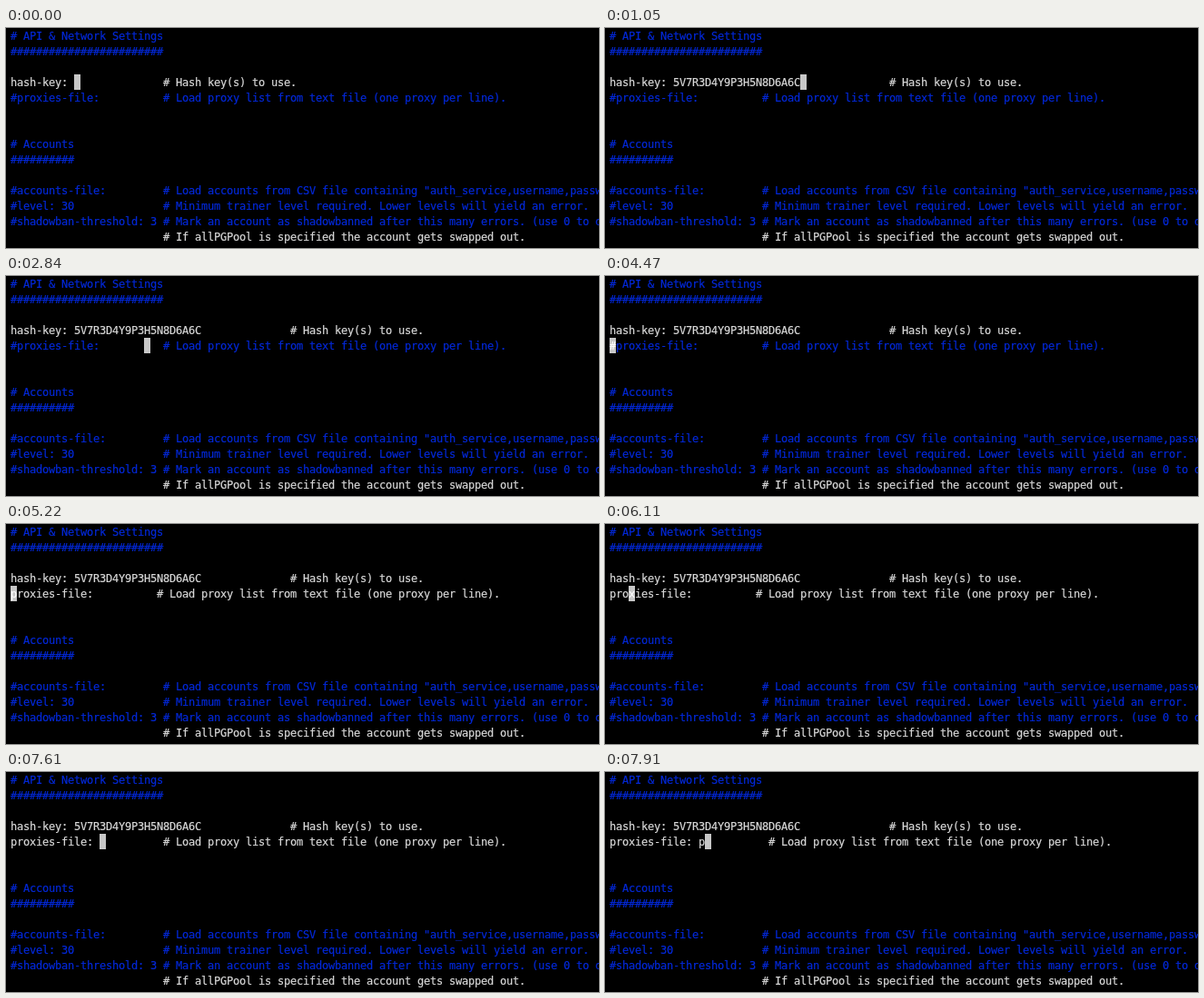
An HTML page for the animation above (8 s loop, 653 px wide and 242 px high).

```html
<!DOCTYPE html>
<html lang="en">
<head>
<meta charset="utf-8">
<title>Config editing</title>
<style>
  html, body { margin: 0; width: 100%; height: 100%; overflow: hidden; background: #000; }
  #screen {
    position: relative; width: 653px; height: 242px; overflow: hidden;
    font: 12px/19px "DejaVu Sans Mono", Menlo, monospace;
    font-variant-ligatures: none;
    -webkit-text-stroke: 0.2px;
    color: #d8d8d8;
  }
  .row { position: absolute; left: 5px; height: 17px; white-space: pre; }
  .blue { color: #0328d8; }
  #cursor {
    position: absolute; width: 7px; height: 17px; overflow: hidden;
    white-space: pre; background: #c7c7c7; color: #fff;
  }
</style>
</head>
<body>
<div id="screen"></div>
<script>
const CELL = 7, LINE = 17, LEFT = 5, LOOP = 8000, COMMENT = 24;
const KEY_ROW = 3, PROXY_ROW = 4;
const screen = document.getElementById("screen");

const entry = (name, note, col = COMMENT) => name.padEnd(col) + note;
const keyNote = "# Hash key(s) to use.";
const proxyNote = "# Load proxy list from text file (one proxy per line).";

const keyLine = key => "hash-key: " + key + " ".repeat(14) + keyNote;
const emptyKey = keyLine("");
const filledKey = keyLine("5V7R3D4Y9P3H5N8D6A6C");
const commented = entry("#proxies-file:", proxyNote);
const active = entry("proxies-file:", proxyNote, 23);
const spaced = entry("proxies-file: ", proxyNote, 24);
const typed = entry("proxies-file: p", proxyNote, 25);

const lines = [
  "# API & Network Settings",
  "#".repeat(24),
  "",
  emptyKey,
  commented,
  "",
  "",
  "# Accounts",
  "#".repeat(10),
  "",
  entry("#accounts-file:", '# Load accounts from CSV file containing "auth_service,username,password" on each line.'),
  entry("#level: 30", "# Minimum trainer level required. Lower levels will yield an error."),
  entry("#shadowban-threshold: 3", "# Mark an account as shadowbanned after this many errors. (use 0 to disable)"),
  entry("", "# If allPGPool is specified the account gets swapped out.")
];

const rows = lines.map((text, i) => {
  const el = document.createElement("div");
  el.className = "row";
  el.style.top = i * LINE + "px";
  screen.append(el);
  return el;
});
const cursor = document.createElement("div");
cursor.id = "cursor";
screen.append(cursor);

// Snap the font's advance to the terminal's whole-pixel cell.
rows[0].textContent = "0".repeat(100);
const advance = rows[0].getBoundingClientRect().width / 100;
screen.style.letterSpacing = CELL - advance + "px";

function setRow(i, text) {
  if (rows[i].textContent === text) return;
  rows[i].textContent = text;
  rows[i].classList.toggle("blue", text.startsWith("#"));
}
lines.forEach((text, i) => setRow(i, text));

// Cursor moves while an arrow key is held down.
const glide = (start, end, count, from, to) =>
  Array.from({ length: count }, (_, i) => ({
    at: start + (end - start) * i / (count - 1),
    col: Math.round(from + (to - from) * (i + 1) / count)
  }));

const steps = [
  { at: 0, row: KEY_ROW, col: 10, key: emptyKey, proxy: commented },
  { at: 1050, col: 30, key: filledKey },
  { at: 1500, row: PROXY_ROW },
  { at: 1800, col: 29 },
  ...glide(2250, 3280, 8, 29, 16),
  { at: 3430, col: 14 },
  { at: 4470, col: 0 },
  { at: 4920, col: 1 },
  { at: 5220, col: 0, proxy: active },
  { at: 5520, col: 1 },
  ...glide(6110, 7010, 7, 1, 13),
  { at: 7610, col: 14, proxy: spaced },
  { at: 7910, col: 15, proxy: typed }
];

function draw(now) {
  const t = now % LOOP;
  const state = Object.assign({}, ...steps.filter(s => s.at <= t));
  setRow(KEY_ROW, state.key);
  setRow(PROXY_ROW, state.proxy);
  cursor.style.left = LEFT + state.col * CELL + "px";
  cursor.style.top = state.row * LINE + "px";
  cursor.textContent = rows[state.row].textContent[state.col];
}

const begin = performance.now();
function tick() {
  draw(performance.now() - begin);
  requestAnimationFrame(tick);
}
tick();
</script>
</body>
</html>
```
